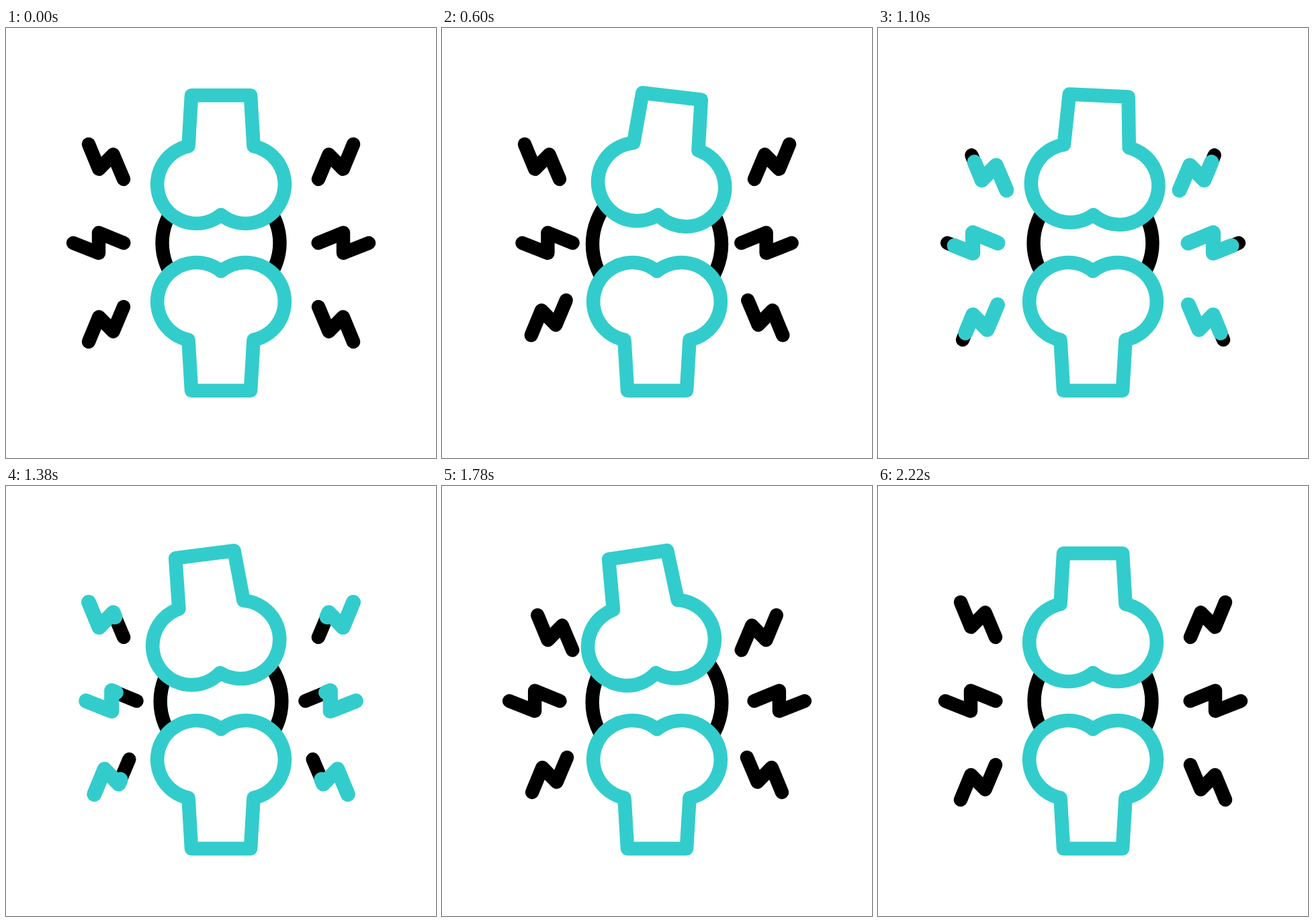
These frames come from a looping animation (640 by 640 pixels, 2400 ms). An HTML page:

```html
<!DOCTYPE html>
<html lang="en">
<head>
<meta charset="utf-8">
<title>Joint pain</title>
<style>
  html, body { margin: 0; width: 100%; height: 100%; overflow: hidden; background: #fff; }
  svg { display: block; width: 100%; height: 100%; }
  .line { fill: none; stroke: #000; stroke-width: 20.4; stroke-linecap: round; stroke-linejoin: round; }
  .teal { stroke: #33cccc; }
  .bone { fill: #fff; stroke-width: 20.6; }
  .glow { stroke-width: 22.2; }
</style>
</head>
<body>
<svg viewBox="0 0 640 640">
  <defs>
    <path id="bone" d="M276 100.3H364L368.5 175.8A58.2 58.2 0 1 1 320 278A58.2 58.2 0 1 1 271.5 175.8Z"/>
  </defs>
  <circle id="ring" class="line" cx="320" cy="320" r="87.5"/>
  <use href="#bone" class="line teal bone" transform="matrix(1 0 0 -1 0 640)"/>
  <use href="#bone" id="upper" class="line teal bone"/>
  <g id="left"></g>
  <g id="right" transform="matrix(-1 0 0 1 640 0)"></g>
</svg>
<script>
const LOOP = 2400;
const SHAKE = 19.4;
const $ = id => document.getElementById(id);

// Each bolt is drawn from its inner end; dx, dy give the shake direction.
const BOLTS = [
  { d: 'M175 225L159.5 188.3L138.3 210L123 173', dx: 1, dy: 1, start: 600 },
  { d: 'M175.3 320L138 304.7V335L100 320', dx: 1, dy: 0, start: 200 },
  { d: 'M175 415L159.5 451.7L138.3 430L123 467', dx: 1, dy: -1, start: 400 }
];

const TILT = [[200, 0], [800, 9], [1600, -11], [2200, 0]];
const SWELL = [[200, 0], [700, 1], [1200, 0], [1700, 1], [2200, 0]];
const TRIM_END = [[700, 0], [1200, 1]];
const TRIM_START = [[1200, 0], [1700, 1]];
const shakeKeys = t0 => [0, 1, 0, 1, 0].map((v, i) => [t0 + i * 400, v * SHAKE]);

// Eased value between the keys, held before the first and after the last.
function at(keys, t) {
  if (t <= keys[0][0]) return keys[0][1];
  for (let i = 1; i < keys.length; i++) {
    const [t0, a] = keys[i - 1], [t1, b] = keys[i];
    if (t < t1) {
      const k = (t - t0) / (t1 - t0);
      return a + (b - a) * k * k * (3 - 2 * k);
    }
  }
  return keys[keys.length - 1][1];
}

function add(parent, tag, attrs) {
  const el = document.createElementNS('http://www.w3.org/2000/svg', tag);
  for (const name in attrs) el.setAttribute(name, attrs[name]);
  return parent.appendChild(el);
}

const bolts = [];
for (const side of [$('left'), $('right')]) {
  for (const b of BOLTS) {
    const g = add(side, 'g', {});
    add(g, 'path', { d: b.d, class: 'line' });
    const glow = add(g, 'path', { d: b.d, class: 'line teal glow', pathLength: 1 });
    bolts.push({ ...b, g, glow, keys: shakeKeys(b.start) });
  }
}

function draw(t) {
  $('upper').setAttribute('transform', `rotate(${at(TILT, t)} 320 290)`);

  const swell = at(SWELL, t);
  $('ring').setAttribute('r', 87.5 + 9.5 * swell);
  $('ring').setAttribute('cy', 320 + 2 * swell);

  const from = at(TRIM_START, t), to = at(TRIM_END, t);
  for (const { g, glow, keys, dx, dy } of bolts) {
    const s = at(keys, t);
    g.setAttribute('transform', `translate(${s * dx} ${s * dy})`);
    glow.style.display = to > from ? '' : 'none';
    glow.setAttribute('stroke-dasharray', `${to - from} 2`);
    glow.setAttribute('stroke-dashoffset', -from);
  }
}

const begin = performance.now();
function tick() {
  draw((performance.now() - begin) % LOOP);
  requestAnimationFrame(tick);
}
tick();
</script>
</body>
</html>
```
